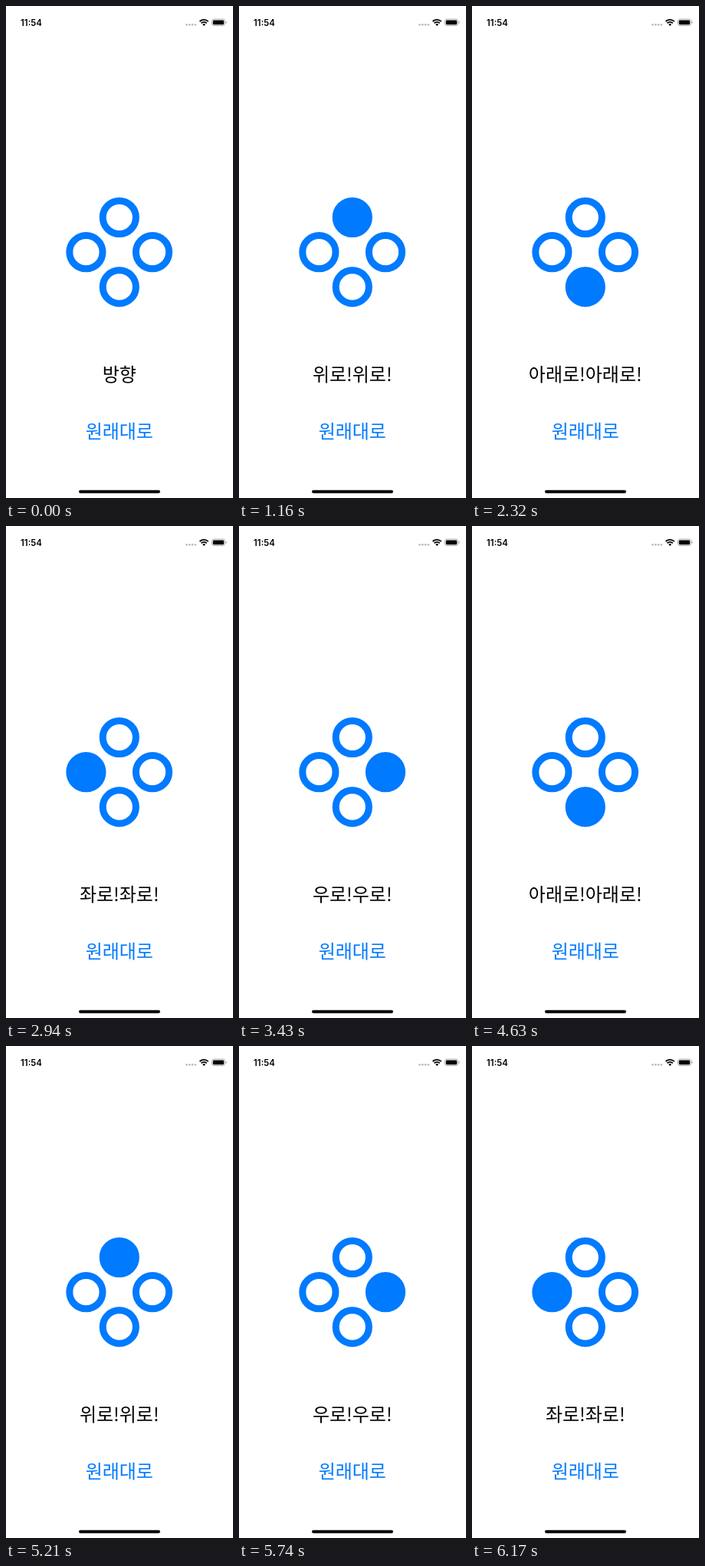
Animation, 296 px wide and 640 px high, one loop 6600 ms. Source, as an HTML page:

```html
<!DOCTYPE html>
<html lang="ko">
<head>
<meta charset="utf-8">
<style>
  html, body { margin: 0; width: 100%; height: 100%; overflow: hidden; background: #fff; }
  svg { display: block; width: 100%; height: 100%; }
  .label { font: 24px "Noto Sans CJK KR", "Noto Sans CJK", sans-serif; text-anchor: middle; }
  .clock { font: 600 11.4px Inter, sans-serif; }
  #pad { fill: #fff; stroke: #007aff; stroke-width: 9; }
  #pad .on { fill: #007aff; }
</style>
</head>
<body>
<svg viewBox="0 0 296 640">
  <text class="clock" x="19" y="25.6">11:54</text>
  <g fill="#bfbfbf">
    <circle cx="235.5" cy="24.3" r="1.4"/>
    <circle cx="239.3" cy="24.3" r="1.4"/>
    <circle cx="243.1" cy="24.3" r="1.4"/>
    <circle cx="246.9" cy="24.3" r="1.4"/>
  </g>
  <g fill="none" stroke="#000" stroke-width="1.8">
    <path d="M252.6 20.2a8 8 0 0 1 11.2 0M254.6 22.4a5.1 5.1 0 0 1 7.2 0"/>
    <path d="M258.2 25.9l-1.9-1.9a2.7 2.7 0 0 1 3.8 0z" fill="#000" stroke="none"/>
  </g>
  <rect x="268.5" y="17.1" width="17" height="8.4" rx="2.4" fill="none" stroke="#a6a6a6" stroke-width=".9"/>
  <rect x="269.8" y="18.4" width="14.4" height="5.8" rx="1.3"/>
  <path d="M286.6 19.8q1.3.4 1.3 1.5t-1.3 1.5z" fill="#a6a6a6"/>

  <g id="pad">
    <circle cx="147.8" cy="275" r="21.6"/>
    <circle cx="147.8" cy="365.4" r="21.6"/>
    <circle cx="104.4" cy="320.2" r="21.6"/>
    <circle cx="191" cy="320.2" r="21.6"/>
  </g>
  <text class="label" id="message" x="147.8" y="488.3">방향</text>
  <text class="label" x="147.8" y="561.6" fill="#007aff">원래대로</text>
  <rect x="95" y="629.7" width="106" height="4" rx="2"/>
</svg>
<script>
  const LOOP = 6600;
  const UP = 0, DOWN = 1, LEFT = 2, RIGHT = 3, NONE = 4;
  const words = ["위로!위로!", "아래로!아래로!", "좌로!좌로!", "우로!우로!", "방향"];
  const steps = [
    [0, NONE], [1160, UP], [2320, DOWN], [2940, LEFT], [3430, RIGHT],
    [3940, UP], [4630, DOWN], [5210, UP], [5740, RIGHT], [6170, LEFT]
  ];
  const buttons = [...document.querySelectorAll("#pad circle")];
  const message = document.getElementById("message");
  const start = performance.now();
  let shown = NONE;

  function draw() {
    const time = (performance.now() - start) % LOOP;
    const state = steps.findLast(([from]) => from <= time)[1];
    if (state !== shown) {
      buttons.forEach((button, i) => button.classList.toggle("on", i === state));
      message.textContent = words[state];
      shown = state;
    }
    requestAnimationFrame(draw);
  }
  draw();
</script>
</body>
</html>
```
